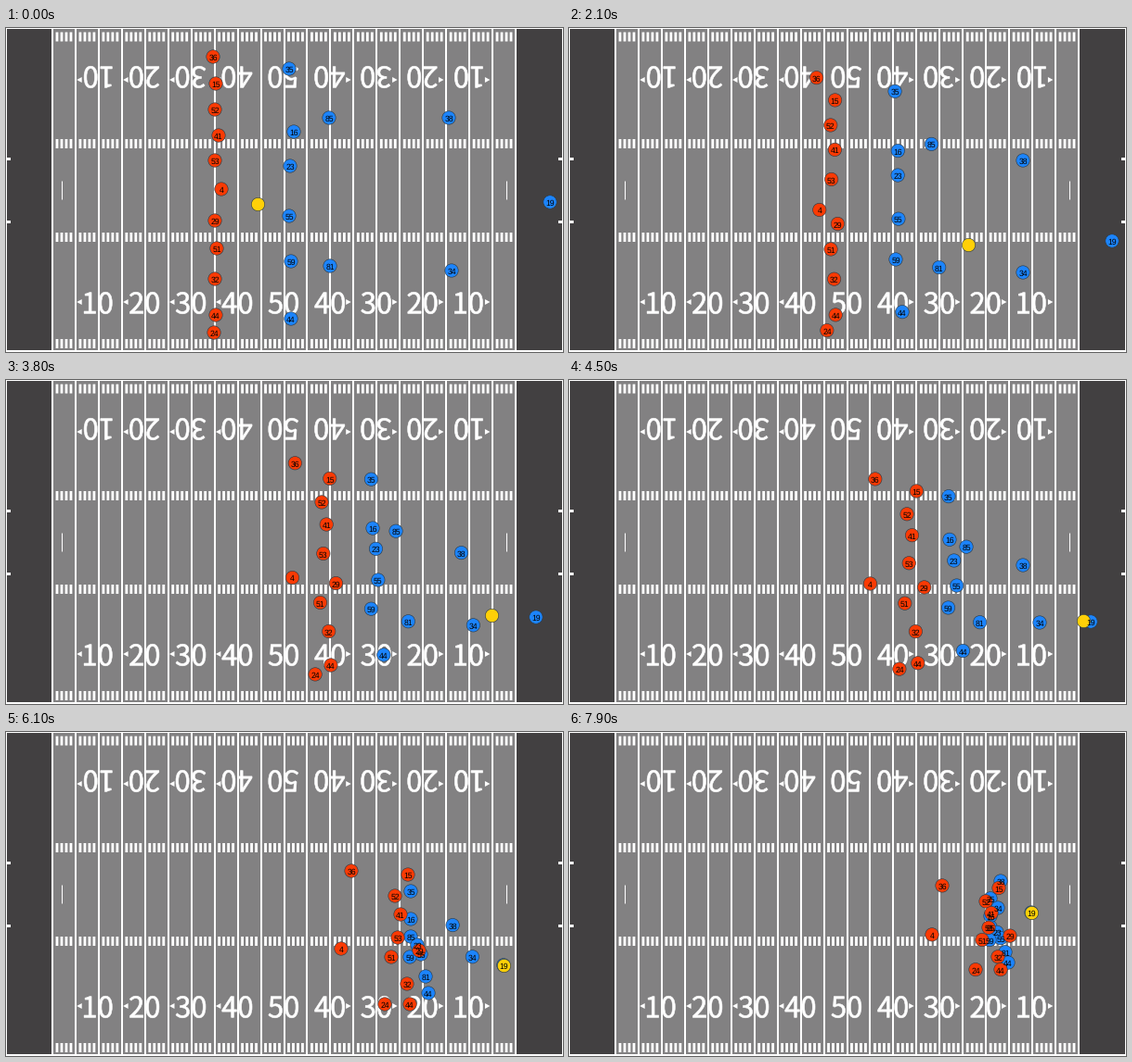
Animation of 600x350 px, one loop 8000 ms. Source, as a matplotlib script:

```python
import numpy as np
import matplotlib.pyplot as plt
from matplotlib.animation import FuncAnimation
from matplotlib.patches import PathPatch, Polygon, Rectangle
from matplotlib.textpath import TextPath
from matplotlib.transforms import Affine2D

plt.rcParams["text.hinting"] = "none"

W, H, DPI = 600, 350, 100
PX = 72 / DPI
FRAMES, STEP = 80, 100
GOAL, YARD = 50, 4.99
CATCH, CONTACT, END = 4.6, 6.1, 7.9
LANE = 193
RED, BLUE, GOLD, EDGE = "#fa3a04", "#1c84fc", "#ffd008", "#2c3a44"


def covered(t):
    """Distance after a quick build-up to steady speed."""
    return t - 0.45 * (1 - np.exp(-t / 0.45))


def runner(start, contact, fade=1, bend=1.35, drift=30):
    """Run from start to contact, then close in on the returner's lane.

    fade > 1 slows down before contact, bend > 1 delays the sideways move.
    """
    x0, y0 = start
    x1, y1 = contact

    def at(t):
        f = covered(min(t, CONTACT)) / covered(CONTACT)
        x = x0 + (x1 - x0) * (1 - (1 - f) ** fade)
        y = y0 + (y1 - y0) * f ** bend
        u = max(0, t - CONTACT) / (END - CONTACT)
        return x + drift * u, y + 0.37 * (LANE - y1) * u ** 1.2
    return at


def deep(*keys):
    """Cubic through four key points, for players who turn around."""
    curve = np.polyfit((0, 2.1, 4.5, END), np.array(keys), 3)
    return lambda t: tuple(t ** np.arange(3, -1, -1) @ curve)


def kick(t):
    return 271 + 529 * (1 - np.exp(-0.17 * t)), 190 + 94.5 * (1 - np.exp(-0.3 * t))


players = []


def blocker(num, start, contact, fade=1.25, bend=1.2):
    players.append((BLUE, num, runner(start, contact, fade, bend, 18)))


def chaser(num, start, contact, bend=1.35):
    players.append((RED, num, runner(start, contact, bend=bend)))


blocker(35, (305, 44), (436, 172), bend=1.35)
blocker(16, (310, 112), (436, 202))
blocker(85, (348, 97), (436, 221), fade=1.9)
blocker(23, (306, 149), (443, 230), bend=1.7)
blocker(55, (305, 203), (447, 240), bend=2)
blocker(59, (307, 252), (435, 243))
blocker(81, (349, 257), (452, 264), fade=1.9)
blocker(44, (307, 314), (455, 282))

returner = deep((586, 188), (585, 230), (562, 261), (498, 195))
players += [
    (BLUE, 38, deep((477, 97), (489, 143), (489, 200), (465, 161))),
    (BLUE, 34, deep((480, 262), (489, 264), (507, 262), (462, 190))),
    (BLUE, 19, returner),
]

chaser(36, (223, 31), (372, 150))
chaser(15, (226, 60), (433, 154))
chaser(52, (225, 88), (419, 177))
chaser(41, (229, 116), (425, 197))
chaser(53, (225, 143), (422, 222), bend=1.1)
chaser(4, (232, 174), (361, 234), bend=0.8)
chaser(29, (225, 208), (445, 236), bend=1.7)
chaser(51, (227, 238), (415, 243))
chaser(32, (225, 271), (432, 272))
chaser(44, (226, 310), (435, 294), bend=4)
chaser(24, (224, 329), (408, 294), bend=2.2)

fig = plt.figure(figsize=(W / DPI, H / DPI), dpi=DPI, facecolor="white")
ax = fig.add_axes([0, 0, 1, 1])
ax.set(xlim=(0, W), ylim=(H, 0))
ax.axis("off")


def box(x, y, w, h, color):
    ax.add_patch(Rectangle((x, y), w, h, fc=color, lw=0, zorder=0))


def yard_number(x, y, label, flip):
    path = TextPath((0, 0), label, size=31, prop={"family": "Noto Sans CJK JP"})
    b = path.get_extents()
    sx, sy = (-1, 1) if flip else (1, -1)
    move = Affine2D().translate(-(b.x0 + b.x1) / 2, -(b.y0 + b.y1) / 2).scale(sx, sy).translate(x, y)
    ax.add_patch(PathPatch(move.transform_path(path), fc="white", ec="white",
                           lw=0.6 * PX, zorder=2))


def arrow(x, y, side):
    tip, base = x + side * 23, x + side * 17.5
    ax.add_patch(Polygon([(tip, y), (base, y - 3), (base, y + 3)], fc="white", lw=0, zorder=2))


def draw_field():
    box(1, 1, 598, 347, "#424041")
    box(GOAL, 1, 100 * YARD, 347, "#828182")
    yards = np.arange(101)
    xs = GOAL + YARD * yards
    ax.vlines(xs[yards % 5 == 0], 1, 348, color="white", lw=2 * PX, zorder=1)
    for top in (4.5, 120, 221, 336):
        ax.vlines(xs[yards % 5 > 0], top, top + 10, color="white",
                  lw=2.8 * PX, snap=False, zorder=1)
    ax.vlines(xs[[2, 98]], 165, 185, color="white", lw=PX, zorder=1)
    for y in (140, 208):
        box(0, y, 5, 2.5, "white")
        box(595, y, 5, 2.5, "white")
    for yard in range(10, 91, 10):
        x = xs[yard] - 0.7
        side = np.sign(yard - 50)
        for y, arrow_y, flip in ((53, 56, True), (297, 296, False)):
            yard_number(x, y, str(50 - abs(yard - 50)), flip)
            if side:
                arrow(x, arrow_y, side)


def discs(points, colors, zorder):
    return ax.scatter(*np.transpose(points), s=(14.4 * PX) ** 2, c=colors,
                      edgecolors=EDGE, linewidths=0.6 * PX, zorder=zorder)


draw_field()
dots = discs([at(0) for _, _, at in players], [color for color, _, _ in players], 3)
ball = discs([kick(0)], [GOLD], 4)
labels = [ax.text(0, 0, str(num), family="Liberation Sans", fontsize=8.6 * PX,
                  ha="center", va="baseline", color="black", zorder=5)
          for _, num, _ in players]


def update(i):
    t = i * STEP / 1000
    spots = np.array([at(t) for _, _, at in players])
    dots.set_offsets(spots)
    for text, (x, y) in zip(labels, spots):
        text.set_position((x, y + 4))
    ball.set_offsets([kick(t) if t < CATCH else returner(t)])
    return [dots, ball, *labels]


anim = FuncAnimation(fig, update, frames=FRAMES, interval=STEP, repeat=True,
                     repeat_delay=0, init_func=lambda: update(0))
plt.show()
```
